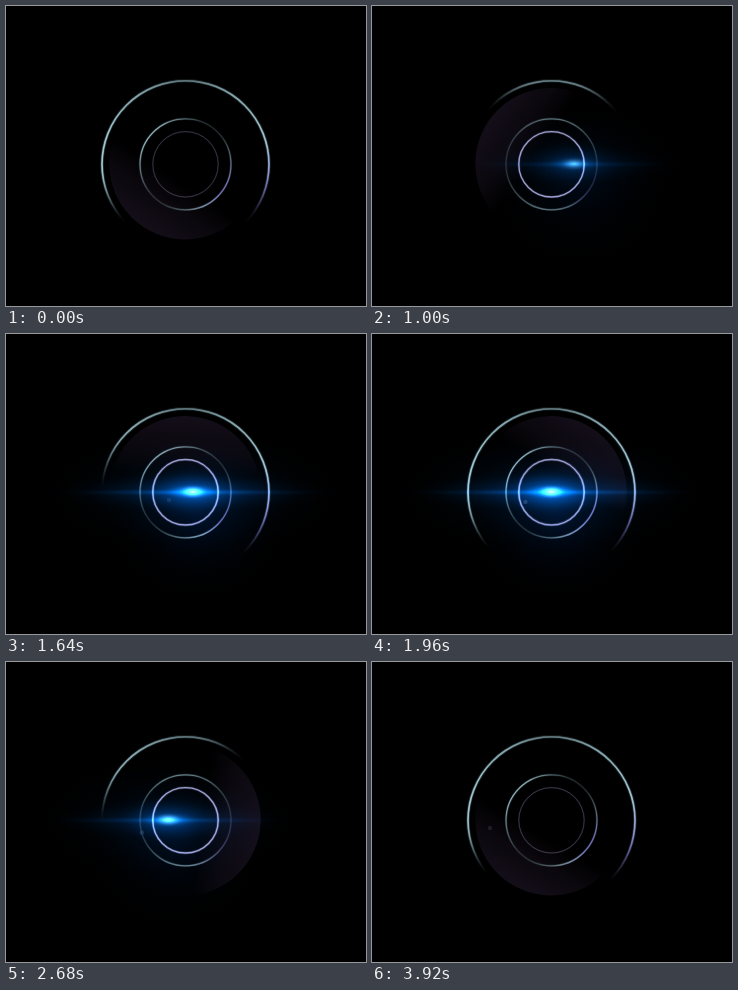
An HTML page with a canvas that plays this animation: 360 px wide and 300 px high, repeating every 3960 ms.

```html
<!DOCTYPE html>
<html lang="en">
<head>
<meta charset="utf-8">
<title>Lens</title>
<style>
html, body { margin: 0; width: 100%; height: 100%; overflow: hidden; background: #000; }
canvas { display: block; width: 360px; height: 300px; }
</style>
</head>
<body>
<canvas id="stage" width="360" height="300"></canvas>
<script>
const ctx = document.getElementById('stage').getContext('2d');
const LOOP = 3960, STEP = 40, TAU = Math.PI * 2, RAD = Math.PI / 180;
const CX = 179.5, CY = 158.3;
const TEAL = [178, 222, 234], VIOLET = [145, 142, 230], LILAC = [192, 188, 242];

const mix = (a, b, k) => a + (b - a) * k;
const blend = (a, b, k) => a.map((v, i) => mix(v, b[i], k));
const clamp = v => Math.max(0, Math.min(1, v));
const smooth = v => { v = clamp(v); return v * v * (3 - 2 * v); };
const rgba = (c, a) => `rgba(${c.map(Math.round)},${clamp(a)})`;
const cool = deg => blend(TEAL, VIOLET, smooth(1 - Math.abs(deg - 120) / 55));

// Stroke a circle; level and tint are functions of degrees clockwise from the top
function ring(r, width, level, tint) {
  const g = ctx.createConicGradient(-Math.PI / 2, CX, CY);
  for (let deg = 0; deg <= 360; deg += 5) {
    g.addColorStop(deg / 360, rgba(tint(deg), level(deg)));
  }
  ctx.strokeStyle = g;
  for (const [w, a] of [[width * 2, .2], [width, .9]]) {
    ctx.globalAlpha = a;
    ctx.lineWidth = w;
    ctx.beginPath();
    ctx.arc(CX, CY, r, 0, TAU);
    ctx.stroke();
  }
  ctx.globalAlpha = 1;
}

// Light spreads from the top down both sides, the right side leading
function outerLevel(swing) {
  return deg => {
    const right = deg <= 180;
    const d = right ? deg : 360 - deg;
    const reach = 90 + 50 * Math.cos(swing + (right ? 35 : -35) * RAD);
    const gain = Math.sqrt((reach - 38) / 102);
    const lobe = Math.sin(Math.PI / 2 * clamp(d / reach * 1.4));
    return (.5 + .5 * gain * lobe) * smooth((reach + 4 - d) / 45);
  };
}

// Two opposite highlights on a rocking axis
function middleLevel(swing) {
  const axis = -25 - 28 * Math.cos(swing);
  const peak = .5 + .2 * Math.cos(swing);
  return deg => .17 + peak * Math.cos((deg - axis) * RAD) ** 2;
}

// Dark sheen, one clockwise turn per loop
function sheen(t) {
  ctx.save();
  ctx.translate(179, 157.8);
  ctx.rotate((214 + t / LOOP * 360) * RAD);
  const g = ctx.createLinearGradient(0, -18, 0, -76);
  g.addColorStop(0, 'rgba(18,12,22,0)');
  g.addColorStop(.4, 'rgba(18,12,22,.6)');
  g.addColorStop(1, 'rgba(20,14,25,1)');
  ctx.fillStyle = g;
  ctx.beginPath();
  ctx.arc(0, 0, 75.7, 0, TAU);
  ctx.fill();
  ctx.restore();
}

function glow(x, y, rx, ry, color, a) {
  ctx.save();
  ctx.translate(x, y);
  ctx.scale(rx, ry);
  const g = ctx.createRadialGradient(0, 0, 0, 0, 0, 1);
  for (let p = 0; p <= 1; p += .125) g.addColorStop(p, rgba(color, a * (1 - p) ** 1.8));
  ctx.fillStyle = g;
  ctx.fillRect(-1, -1, 2, 2);
  ctx.restore();
}

function flare(t, power) {
  const x = 202 - (t - 1000) * .0236;
  const k = power ** 1.35;
  const span = 85 + 65 * k;
  ctx.globalCompositeOperation = 'lighter';
  glow(x, CY, span, 62, [0, 42, 88], .5 * k);
  glow(x + 6, CY + 28, 90, 80, [0, 24, 62], .5 * k);
  glow(x, CY, span, 20, [0, 70, 150], .55 * k);
  glow(x, CY, span, 4, [0, 90, 180], .6 * k);
  glow(x, CY, 52, 28, [0, 95, 200], .6 * k);
  glow(x, CY - .5, 30, 8, [20, 160, 255], .9 * k);
  glow(x, CY - .5, 15, 7, [205, 240, 235], 1.1 * k);
  ctx.globalCompositeOperation = 'source-over';
}

// Faint speck drifting left and slowing down
function speck(t, power) {
  if (t < 1260) return;
  const u = (t - 1640) / 2280;
  const a = .6 * Math.abs(Math.sin(Math.PI * (t - 1260) / 1980));
  ctx.fillStyle = rgba(blend([52, 48, 62], [55, 100, 150], power), a);
  ctx.beginPath();
  ctx.arc(163 - 72 * u + 27 * u * u, 166 + 4.5 * Math.sin(Math.PI * u), 2.2, 0, TAU);
  ctx.fill();
}

function draw(t) {
  const swing = TAU * t / (LOOP / 2);
  const power = Math.sin(Math.PI * t / LOOP) ** 2;
  const inner = .5 + .5 * Math.sqrt(power) - .2 * Math.cos(swing / 2) ** 2;
  ctx.fillStyle = '#000';
  ctx.fillRect(0, 0, 360, 300);
  sheen(t);
  ring(83.5, 1.7, outerLevel(swing), cool);
  ring(45.5, 1.2, middleLevel(swing), cool);
  ring(32.7, mix(.8, 1.5, Math.sqrt(power)), () => inner, () => LILAC);
  flare(t, power);
  speck(t, power);
}

const start = performance.now();
function tick() {
  const t = (performance.now() - start) % LOOP;
  draw(Math.floor(t / STEP) * STEP);
  requestAnimationFrame(tick);
}
tick();
</script>
</body>
</html>
```
